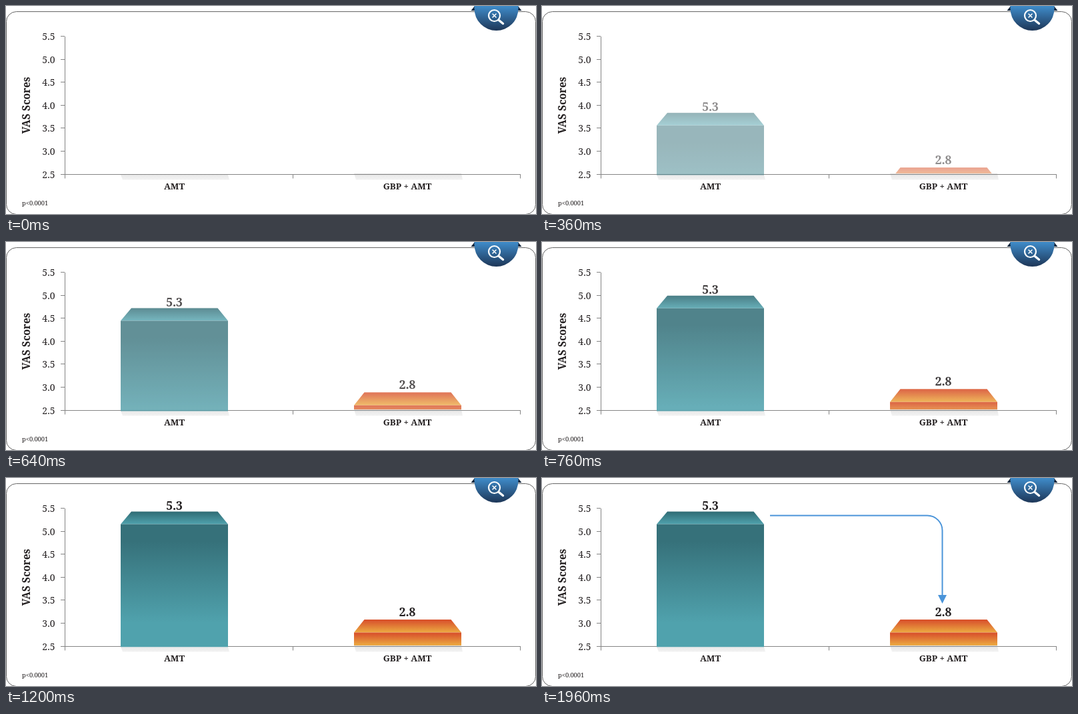
An HTML page that plays this animation: 795 by 313 pixels, repeating every 8000 ms.

```html
<!DOCTYPE html>
<html lang="en">
<head>
<meta charset="utf-8">
<title>VAS Scores</title>
<style>
  html, body { margin: 0; width: 100%; height: 100%; overflow: hidden; background: #fff; }
  svg { display: block; }
  text { font-family: "Noto Serif", Cambria, serif; fill: #231f20; }
  .bold { font-weight: 700; text-anchor: middle; }
  .line { fill: none; stroke: #858585; }
</style>
</head>
<body>
<svg width="795" height="313" viewBox="0 0 795 313">
  <defs>
    <linearGradient id="tealTop" x2="0" y2="1">
      <stop stop-color="#2f6b74"/><stop offset="1" stop-color="#50a2ad"/>
    </linearGradient>
    <linearGradient id="tealFront" x2="0" y2="1">
      <stop offset=".14" stop-color="#36717a"/><stop offset=".8" stop-color="#50a2ad"/>
    </linearGradient>
    <linearGradient id="orange" x2="0" y2="1">
      <stop offset=".1" stop-color="#d9552d"/><stop offset=".95" stop-color="#eba640"/>
    </linearGradient>
    <linearGradient id="badge" x2="0" y2="1">
      <stop stop-color="#3f8cca"/><stop offset="1" stop-color="#1d3657"/>
    </linearGradient>
    <linearGradient id="shade" x2="0" y2="1">
      <stop stop-color="#e6e6e6"/><stop offset="1" stop-color="#f3f3f3"/>
    </linearGradient>
    <clipPath id="tealClip"><rect x="160" width="190" height="254.5"/></clipPath>
    <clipPath id="orangeClip"><rect x="510" width="190" height="252"/></clipPath>
  </defs>

  <rect class="line" style="stroke:#666" x=".5" y="8.5" width="794" height="305" rx="15"/>

  <path fill="#14263c" d="M703 0L697.5 7H705V0zM768 0L773.5 7H766V0z"/>
  <path fill="url(#badge)" d="M702.5 0H768.5V4A33 33 0 0 1 702.5 4z"/>
  <g fill="none" stroke="#fff" stroke-linecap="round">
    <circle cx="732.5" cy="14.5" r="8.5" stroke-width="2.2"/>
    <path stroke-width="1.6" d="M730 12l5 5m0-5l-5 5"/>
    <path stroke-width="3.4" d="M739.5 21.5l6 5"/>
  </g>

  <path fill="url(#shade)" d="M172 254H333L335 261.5H175zM522 252H683L685 261.5H525z"/>
  <g id="axis"><path class="line" d="M88.5 46V259.5M88 253.5H772M430.5 253V259.5M771.5 253V259.5"/></g>

  <g clip-path="url(#tealClip)"><g id="teal">
    <path fill="url(#tealTop)" d="M188 50.5H317.5L333 69.5H172z"/>
    <path fill="url(#tealFront)" d="M172 69.5H333V254.5H172z"/>
    <text class="bold" x="252.5" y="47.5" font-size="17.5">5.3</text>
  </g></g>
  <g clip-path="url(#orangeClip)"><g id="amber">
    <path fill="url(#orange)" d="M537.5 213H667.5L683 232.5H522z"/>
    <path fill="url(#orange)" d="M522 232.5H683V252H522z"/>
    <text class="bold" x="602" y="208" font-size="17.5">2.8</text>
  </g></g>

  <path id="arrow" fill="none" stroke="#4a94d9" stroke-width="2"
    d="M342 56.5H578A22.5 22.5 0 0 1 600.5 79V177"/>
  <path id="head" fill="#4a94d9" d="M594 176H607L600.5 189z"/>

  <text class="bold" x="252.5" y="275.5" font-size="13.2">AMT</text>
  <text class="bold" x="602" y="275.5" font-size="13.2">GBP + AMT</text>
  <text class="bold" transform="translate(36 149.5) rotate(-90)" font-size="15.5">VAS Scores</text>
  <text x="24" y="300" font-size="9.3">p&lt;0.0001</text>
</svg>
<script>
  const el = id => document.getElementById(id);
  const LOOP = 8000, STEP = 40;

  let ticks = '';
  for (let i = 0; i < 7; i++) {
    const y = Math.round(46 + i * 34.6);
    ticks += `<path class="line" d="M82 ${y - .5}H88"/>
      <text x="73.5" y="${y + 5}" font-size="14" text-anchor="end">${(5.5 - i / 2).toFixed(1)}</text>`;
  }
  el('axis').insertAdjacentHTML('beforeend', ticks);

  const arrow = el('arrow'), length = arrow.getTotalLength();

  // Quadratic ease-out: share of the way still to go
  const left = (t, start, span) => (1 - Math.min(1, Math.max(0, (t - start) / span))) ** 2;

  function rise(id, drop, rest) {
    el(id).setAttribute('transform', `translate(0 ${drop * rest})`);
    el(id).setAttribute('opacity', 1 - rest);
  }

  function draw(t) {
    const rest = left(t, 0, 1200);
    rise('teal', 225, rest);
    rise('amber', 61, rest);

    const drawn = length * (1 - left(t, 1200, 800));
    arrow.setAttribute('stroke-dasharray', `${drawn} ${length + 9}`);
    arrow.setAttribute('visibility', drawn > 0 ? 'visible' : 'hidden');
    el('head').setAttribute('visibility', t >= 1960 ? 'visible' : 'hidden');
  }

  const begin = performance.now();
  function frame() {
    const t = (performance.now() - begin) % LOOP;
    draw(Math.floor(t / STEP) * STEP);
    requestAnimationFrame(frame);
  }
  frame();
</script>
</body>
</html>
```
